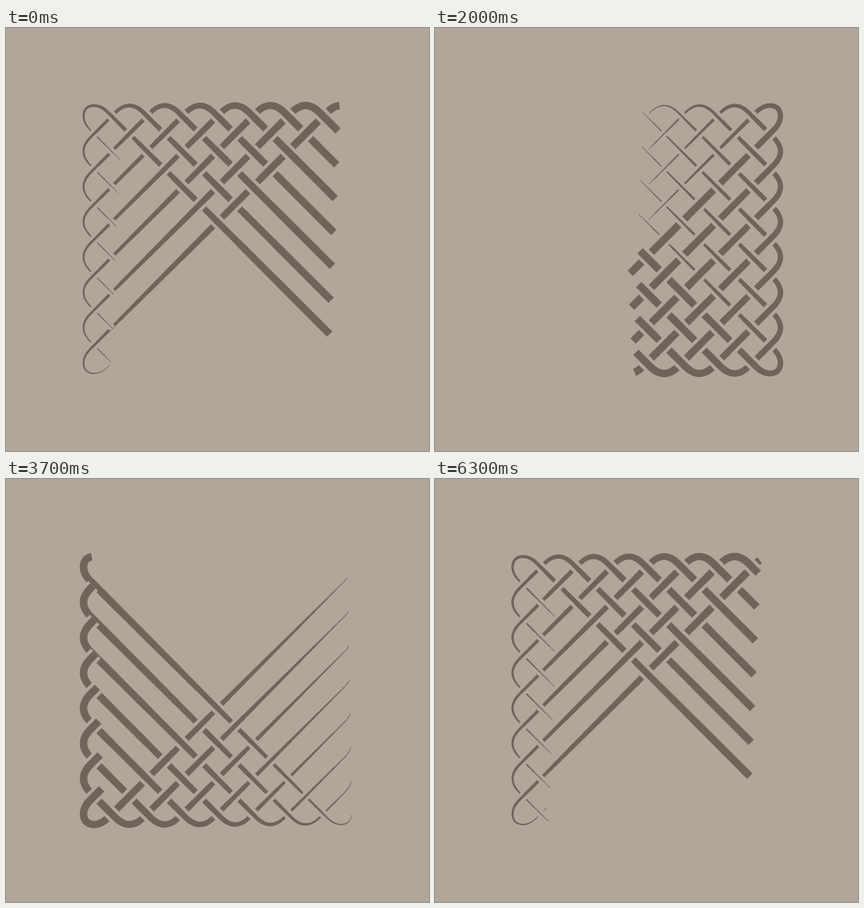
An HTML page with a canvas that plays this animation: 600x600 px, repeating every 6.4 s.

```html
<!DOCTYPE html>
<html lang="en">
<head>
<meta charset="utf-8">
<title>Woven knot</title>
<style>
  html, body { margin: 0; height: 100%; overflow: hidden; background: #b2a69b; }
  canvas { display: block; }
</style>
</head>
<body>
<canvas id="stage" width="600" height="600"></canvas>
<script>
const ctx = document.getElementById('stage').getContext('2d');
const GROUND = '#b2a69b', INK = '#6f635a';
const LOOP = 6400, STEP = 100;
const STRANDS = 8, SIDE = 400, LAP = 2 * SIDE, CELL = 25;
const LENGTH = 420, GAP = 4.5, BEND = 20;

const mod = (a, n) => ((a % n) + n) % n;

// Distance from a wall, bouncing between 0 and SIDE with rounded turns.
function bounce(u) {
  const d = SIDE - Math.abs(SIDE - mod(u, LAP));
  const turn = e => BEND / 2 + e * e / (2 * BEND);
  if (d < BEND) return turn(d);
  if (d > SIDE - BEND) return SIDE - turn(SIDE - d);
  return d;
}

const shift = strand => CELL + 2 * CELL * strand;
const point = (strand, u) => [100 + bounce(u), 100 + bounce(u - shift(strand))];
const thickness = k => 0.7 + 10 * Math.sin(k * Math.PI / 2);

// Tapered band of one strand between u0 and u1, widened by pad on each side.
function ribbon(strand, head, u0, u1, pad, color) {
  const tail = head - LENGTH;
  u0 = Math.max(u0, tail);
  u1 = Math.min(u1, head);
  if (u1 <= u0) return;
  const n = Math.ceil((u1 - u0) / 2), left = [], right = [];
  for (let j = 0; j <= n; j++) {
    const u = u0 + (u1 - u0) * j / n;
    const [x, y] = point(strand, u);
    const [ax, ay] = point(strand, u - 0.5), [bx, by] = point(strand, u + 0.5);
    const r = thickness((u - tail) / LENGTH) / 2 + pad;
    const s = r / Math.hypot(bx - ax, by - ay);
    const nx = (ay - by) * s, ny = (bx - ax) * s;
    left.push([x + nx, y + ny]);
    right.unshift([x - nx, y - ny]);
  }
  ctx.fillStyle = color;
  ctx.beginPath();
  for (const p of left.concat(right)) ctx.lineTo(...p);
  ctx.fill();
}

// Strands alternate over and under at each lattice crossing.
function isOver(strand, k) {
  const v = k * CELL - shift(strand);
  if (mod(k * CELL, SIDE) === 0 || mod(v, SIDE) === 0) return false;
  const sameWay = (mod(k * CELL, LAP) < SIDE) === (mod(v, LAP) < SIDE);
  return (k % 2 === 0) === sameWay;
}

function eachOver(heads, half, pad, color) {
  heads.forEach((head, i) => {
    const last = Math.ceil(head / CELL);
    for (let k = Math.floor((head - LENGTH) / CELL); k <= last; k++) {
      if (isOver(i, k)) ribbon(i, head, k * CELL - half, k * CELL + half, pad, color);
    }
  });
}

function draw() {
  const time = Math.floor((performance.now() % LOOP) / STEP) * STEP;
  const heads = Array.from({ length: STRANDS },
    (_, i) => LAP + 359 + 2 * i + LAP * time / LOOP);
  ctx.fillStyle = GROUND;
  ctx.fillRect(0, 0, 600, 600);
  heads.forEach((head, i) => ribbon(i, head, -Infinity, Infinity, 0, INK));
  eachOver(heads, 10, GAP, GROUND);
  eachOver(heads, 12, 0, INK);
  requestAnimationFrame(draw);
}
draw();
</script>
</body>
</html>
```
